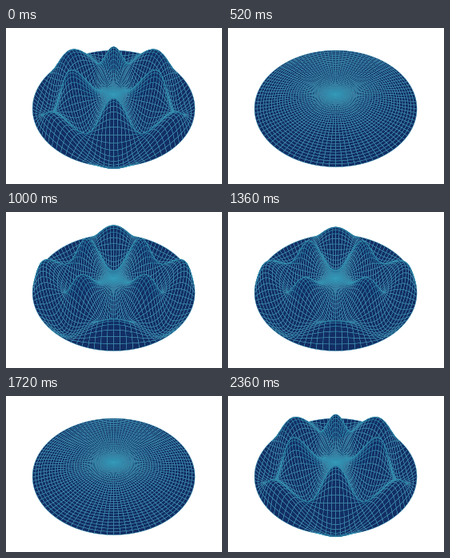
Animation, 270 px wide and 196 px high, one loop 2400 ms. Source, as a matplotlib script:

```python
import numpy as np
import matplotlib.pyplot as plt
from matplotlib.animation import FuncAnimation
from matplotlib.collections import PolyCollection

# Vibrating circular membrane, mode (4, 2), seen in perspective
W, H, DPI = 270, 196, 100
FRAMES, INTERVAL = 60, 40
ORDER, ROOT = 4, 11.0647          # second zero of J4
RINGS, SPOKES = 30, 100
FACE, EDGE = "#122e64", "#389fbc"

# Camera: elevation (sin, cos), distance, focal length, centre on screen
SIN_E, COS_E = 0.700, 0.714
DIST, FOCAL = 2.945, 290
CX, CY = 134.6, 83.6
PEAK = 58.3                       # frame at which the swing is largest


def bessel(n, x, steps=200):
    tau = (np.arange(steps) + 0.5) * np.pi / steps
    return np.cos(n * tau - x[..., None] * np.sin(tau)).mean(axis=-1)


def project(u, v, z):
    """u to the right, v towards the viewer, z up."""
    depth = DIST - v * COS_E - z * SIN_E
    x = CX + FOCAL * u / depth
    y = CY + FOCAL * (v * SIN_E - z * COS_E) / depth
    return x, y, depth


def corners(a):
    """The four corner values of every grid cell."""
    cells = [a[:-1, :-1], a[1:, :-1], a[1:, 1:], a[:-1, 1:]]
    return np.stack([c.ravel() for c in cells], axis=-1)


r = np.linspace(0, 1, RINGS + 1)
theta = np.linspace(0, 2 * np.pi, SPOKES + 1)
U = np.outer(r, np.sin(theta))
V = np.outer(r, np.cos(theta))
SHAPE = np.outer(bessel(ORDER, ROOT * r), np.cos(ORDER * theta))

fig = plt.figure(figsize=(W / DPI, H / DPI), dpi=DPI, facecolor="white")
ax = fig.add_axes([0, 0, 1, 1])
ax.set_xlim(0, W)
ax.set_ylim(H, 0)
ax.axis("off")

mesh = PolyCollection([], facecolors=FACE, edgecolors=EDGE,
                      linewidths=0.4 * 72 / DPI, snap=False)
ax.add_collection(mesh, autolim=False)


def draw(k):
    swing = np.cos(2 * np.pi * (k - PEAK) / FRAMES)
    x, y, depth = project(U, V, swing * SHAPE)
    quads = np.stack([corners(x), corners(y)], axis=-1)
    far_first = np.argsort(-corners(depth).mean(axis=1))
    mesh.set_verts(quads[far_first])
    return [mesh]


anim = FuncAnimation(fig, draw, frames=FRAMES, interval=INTERVAL,
                     repeat=True, repeat_delay=0)
plt.show()
```
